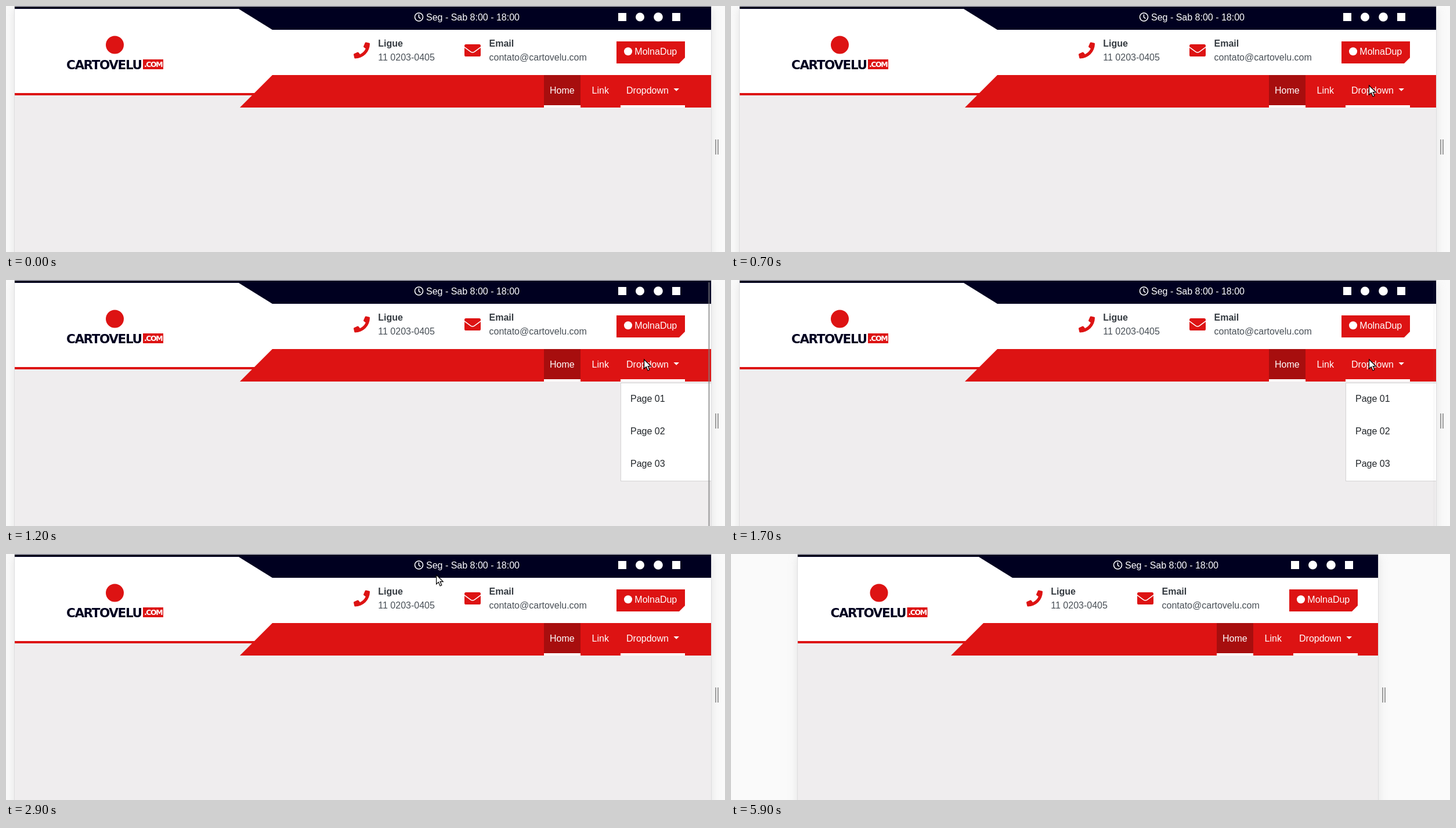
Write an HTML page that moves like this. It is 1239 px wide and 424 px high and loops after 8 s.

```html
<!DOCTYPE html>
<html lang="pt">
<head>
<meta charset="utf-8">
<title>Header</title>
<style>
  @property --k { syntax: "<number>"; inherits: true; initial-value: 0; }

  html, body { margin: 0; width: 100%; height: 100%; overflow: hidden; }
  body { position: relative; background: #fafafa; animation: narrow 8s step-end infinite; }
  svg { position: absolute; display: block; overflow: visible; }

  #page {
    position: absolute; top: 1px; height: 440px; overflow: hidden;
    left: calc(15px + 100px * var(--k));
    width: calc(1200px - 200px * var(--k));
    background: #efedee;
    box-shadow: 0 0 0 1px #dddddf, 0 4px 16px rgba(155, 155, 155, .26);
  }
  #page svg { top: -1px; left: calc(-15px - 100px * var(--k)); }

  /* --dx is how far a group travels when the viewport narrows */
  .move { transform: translateX(calc(var(--dx) * var(--k) * 1px)); }

  text { font: 16px "Liberation Sans", Arial, sans-serif; fill: #fff; white-space: pre; }
  .head { font-weight: bold; fill: #343a40; }
  .info { fill: #495057; }
  .item { fill: #212529; }
  .brand { font: bold 21.5px "DejaVu Sans", sans-serif; letter-spacing: -1.4px; fill: #000020; }
  .tld { font: bold 12.5px "DejaVu Sans", sans-serif; letter-spacing: -1.4px; }
  .red { fill: #dd1313; }
  .white { fill: #fff; }
  .line { fill: none; stroke: #fff; stroke-width: 1.6; }

  #menu { animation: menu 8s step-end infinite; }
  #bar {
    position: absolute; right: 2px; top: 3px; width: 3px; height: 440px;
    background: #808080; animation: bar 8s step-end infinite;
  }
  #grip {
    position: absolute; top: 230px; left: calc(1222px - 100px * var(--k));
    width: 2px; height: 26px; border: solid #9b9b9b; border-width: 0 2px;
  }
  #cursor { left: 0; top: 0; animation: cursor 8s step-end infinite; }

  @keyframes narrow { 0% { --k: 0; } 73.75%, 100% { --k: 1; } }
  @keyframes menu {
    0% { visibility: hidden; }
    15% { visibility: visible; }
    36.25%, 100% { visibility: hidden; }
  }
  @keyframes bar {
    0% { opacity: 0; }
    15% { opacity: .55; }
    18.75% { opacity: .38; }
    20% { opacity: .2; }
    21.25% { opacity: .05; }
    36.25%, 100% { opacity: 0; }
  }
  @keyframes cursor {
    0% { visibility: hidden; transform: translate(1057px, 307px); }
    3.75% { visibility: visible; transform: translate(1057px, 307px); }
    5% { visibility: visible; transform: translate(1082px, 232px); }
    6.25% { visibility: visible; transform: translate(1102px, 174px); }
    7.5% { visibility: visible; transform: translate(1105px, 145px); }
    8.75% { visibility: visible; transform: translate(1099px, 136px); }
    36.25% { visibility: visible; transform: translate(741px, 35px); }
    38.75%, 100% { visibility: hidden; transform: translate(741px, 35px); }
  }
</style>
</head>
<body>
<div id="page">
  <svg width="1239" height="424">
    <rect y="1" width="1239" height="40" fill="#000020"/>
    <rect class="white" y="41" width="1239" height="109"/>
    <path class="move white" style="--dx:26" d="M-100 5H401L459 41H-100z"/>
    <g class="move red" style="--dx:-24">
      <path d="M-100 150H440v4H-100z"/>
      <path d="M459 119H1400v56H403z"/>
    </g>

    <g class="move" style="--dx:67.5">
      <circle class="red" cx="187.5" cy="67" r="15.5"/>
      <text class="brand" x="104" y="108.5">CARTOVELU</text>
      <rect class="red" x="236" y="92" width="35" height="17"/>
      <text class="tld" x="238" y="105">.COM</text>
    </g>

    <g class="move" style="--dx:-45">
      <circle class="line" cx="711.5" cy="19" r="7"/>
      <path class="line" d="M711.4 14.6v4.8l3 2.2"/>
      <text x="724" y="25">Seg - Sab 8:00 - 18:00</text>
    </g>

    <g class="move" style="--dx:-90">
      <g class="white">
        <rect x="1055" y="12" width="14" height="14"/>
        <circle cx="1092.5" cy="19" r="7.5"/>
        <circle cx="1124" cy="19" r="7.8"/>
        <rect x="1148" y="12" width="14" height="14"/>
      </g>

      <path class="red" transform="translate(599 62.5)" d="M27 1.3 21.3 0q-1.1-.1-1.5.8L17.1 6.9q-.3.9.4 1.5l3.3 2.7A20.4 20.4 0 0 1 11.1 20.8l-2.7-3.3q-.6-.7-1.5-.4L.8 19.8Q-.1 20.3 0 21.3L1.3 27q.3 1 1.3 1A25.4 25.4 0 0 0 28 2.6q0-1-1-1.3z"/>
      <text class="head" x="641.3" y="70">Ligue</text>
      <text class="info" x="641.3" y="94">11 0203-0405</text>

      <rect class="red" x="790" y="66" width="28" height="21" rx="2.6"/>
      <path class="line" d="M789.5 70.6l11.2 8.3q3.3 2.2 6.6 0l11.2-8.3"/>
      <text class="head" x="832.5" y="70">Email</text>
      <text class="info" x="832.5" y="94">contato@cartovelu.com</text>

      <path class="red" d="M1052 61h118v28l-10 10h-108z"/>
      <circle class="white" cx="1072" cy="78.3" r="7"/>
      <text x="1083.3" y="84">MolnaDup</text>

      <path fill="#a70e0e" d="M927 119h63v52h-63z"/>
      <path class="white" d="M927 171h63v4h-63zM1059 171h111v4h-111zM1150.4 142h9.6l-4.8 4.8z"/>
      <text x="937" y="151">Home</text>
      <text x="1009.6" y="151">Link</text>
      <text x="1069" y="151">Dropdown</text>

      <g id="menu">
        <rect x="1059.5" y="177.5" width="170" height="169" fill="#fff" stroke="#d4d3d4"/>
        <text class="item" x="1076" y="210">Page 01</text>
        <text class="item" x="1076" y="266">Page 02</text>
        <text class="item" x="1076" y="322">Page 03</text>
      </g>
    </g>
  </svg>
  <div id="bar"></div>
</div>
<div id="grip"></div>
<svg id="cursor" width="13" height="21">
  <path d="M.6 1v16l3.7-3.4 2.8 6.4 2.7-1.2-2.7-6.2h5.1z" fill="#fff" stroke="#000" stroke-width="1.2"/>
</svg>
</body>
</html>
```
